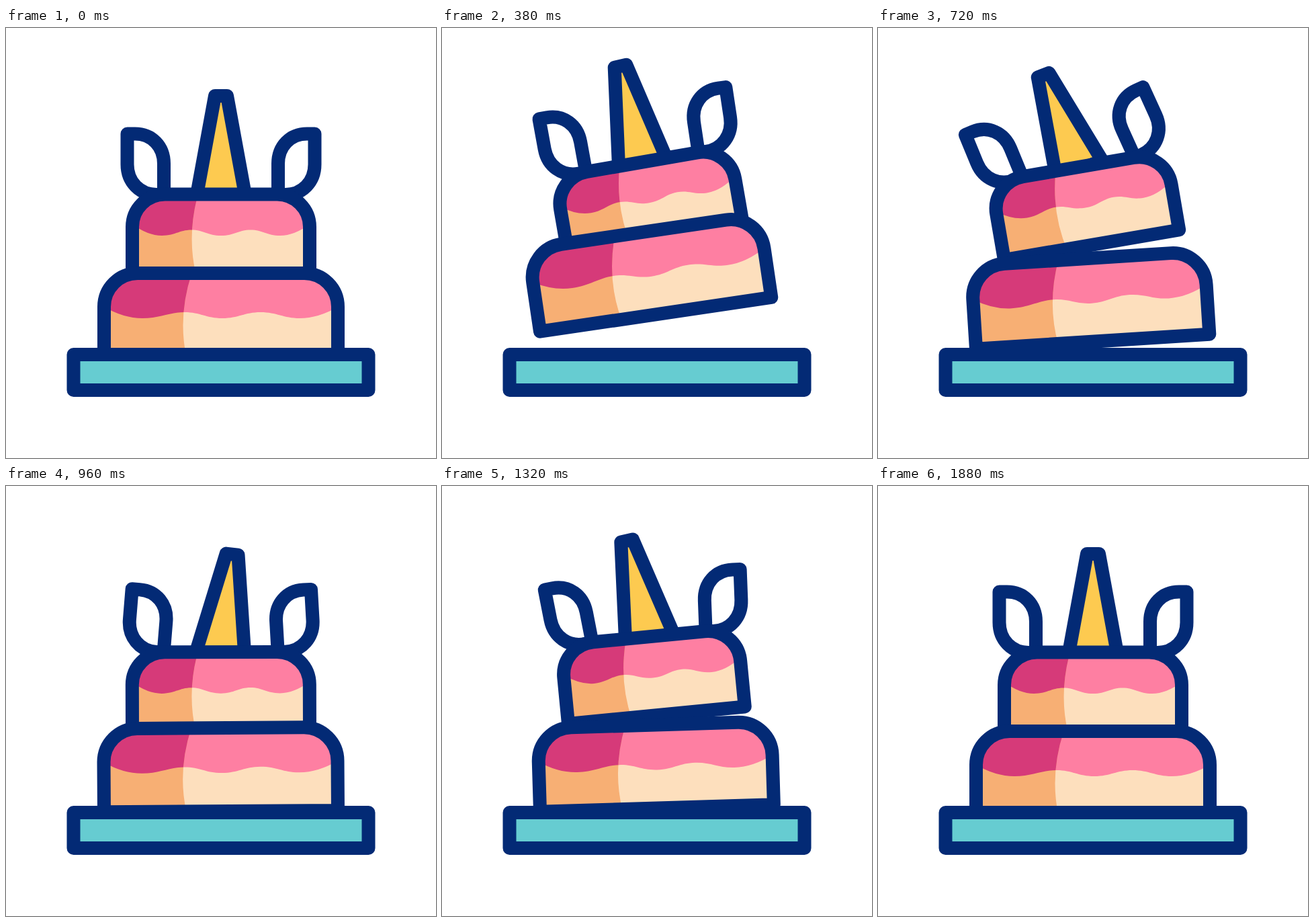
These frames come from a looping animation (640 px wide and 640 px high, 3000 ms). An HTML page:

```html
<!DOCTYPE html>
<html lang="en">
<head>
<meta charset="utf-8">
<title>Unicorn cake</title>
<style>
  html, body { margin: 0; width: 100%; height: 100%; overflow: hidden; background: #fff; }
  svg { display: block; width: 100%; height: 100%; }
  .line { fill: none; stroke: #032a75; stroke-width: 20; stroke-linejoin: round; }
  .cake { fill: #fddfbd; }
  .icing { fill: #fe7fa2; }
  .cakeShade { fill: #f7af74; }
  .icingShade { fill: #d63a79; }
  .gold { fill: #fdca50; }
  .plate { fill: #66ccd1; }
</style>
</head>
<body>
<svg viewBox="0 0 640 640">
  <defs>
    <path id="earShape" d="M180.5 157.5H192C217 157.5 235 176 235 202V248H224C199 248 180.5 229 180.5 203Z"/>
    <path id="upperBody" d="M188 365V296A48.5 48.5 0 0 1 236.5 247.5H403.5A48.5 48.5 0 0 1 452 296V365Z"/>
    <path id="lowerBody" d="M146 489V415A50 50 0 0 1 196 365H444A50 50 0 0 1 494 415V489Z"/>
    <path id="upperIcing" d="M188 240V292Q211 309 232 309C252 309 258 300.5 276 300.5S300 309 320 309S346 300.5 364 300.5S388 309 408 309Q429 309 452 292V240Z"/>
    <path id="lowerIcing" d="M146 355V415Q175 432 203 432C230 432 243 423 266 423S298 432 322 432S355 423 379 423S413 432 437 432Q465 432 494 415V355Z"/>
    <clipPath id="upperClip"><use href="#upperBody"/></clipPath>
    <clipPath id="lowerClip"><use href="#lowerBody"/></clipPath>
    <clipPath id="upperShade"><path d="M180 240H288Q268 305 283 368H180Z"/></clipPath>
    <clipPath id="lowerShade"><path d="M140 355H280Q254 425 269 492H140Z"/></clipPath>
  </defs>

  <g id="upper">
    <g id="leftEar"><use href="#earShape" class="line"/></g>
    <g id="rightEar"><use href="#earShape" class="line" transform="matrix(-1 0 0 1 640 0)"/></g>
    <g id="horn"><path class="line gold" d="M283.5 251L311 101H329L356.5 251Z"/></g>
    <g clip-path="url(#upperClip)">
      <use href="#upperBody" class="cake"/>
      <use href="#upperIcing" class="icing"/>
      <g clip-path="url(#upperShade)">
        <use href="#upperBody" class="cakeShade"/>
        <use href="#upperIcing" class="icingShade"/>
      </g>
    </g>
    <use href="#upperBody" class="line"/>
  </g>

  <g id="lower">
    <g clip-path="url(#lowerClip)">
      <use href="#lowerBody" class="cake"/>
      <use href="#lowerIcing" class="icing"/>
      <g clip-path="url(#lowerShade)">
        <use href="#lowerBody" class="cakeShade"/>
        <use href="#lowerIcing" class="icingShade"/>
      </g>
    </g>
    <use href="#lowerBody" class="line"/>
  </g>

  <rect class="line plate" x="100.5" y="486" width="439" height="53"/>
</svg>

<script>
const LOOP = 3000;
const HOP = 880;
const SECOND_HOP = { size: 0.45, duration: HOP * 0.6 };
const BEAT = 300;

// One smooth rise and fall between 0 and 1.
const bump = x => x > 0 && x < 1 ? Math.sin(Math.PI * x) ** 2 : 0;

// A full hop followed at once by a smaller, quicker one.
const hops = t => bump(t / HOP) + SECOND_HOP.size * bump((t - HOP) / SECOND_HOP.duration);

// Eased swing that reaches one extreme angle per beat and ends upright.
function sway(extremes, t) {
  const beat = Math.max(0, t / BEAT);
  const step = Math.floor(beat);
  const angleAt = i => extremes[i - 1] ?? 0;
  const ease = (1 - Math.cos(Math.PI * (beat - step))) / 2;
  return angleAt(step) + (angleAt(step + 1) - angleAt(step)) * ease;
}

function place(id, lift, angle, x, y) {
  document.getElementById(id).setAttribute('transform', `translate(0 ${-lift}) rotate(${angle} ${x} ${y})`);
}

function draw(now) {
  const t = now % LOOP;
  place('lower', 39 * hops(t), -9.3 * hops(t - 30), 146, 489);
  place('upper', 35 * hops(t - 80), -14.5 * hops(t - 110), 188, 365);
  place('horn', 0, sway([-3, -12, 7, -8, 3.5], t - 80), 320, 247);
  place('leftEar', 0, sway([-0.5, -13.5, 5, -5.7, -1.2], t - 80), 235, 247);
  place('rightEar', 0, sway([1.3, -15.3, -3, 4, -10.5], t - 80), 405, 247);
  requestAnimationFrame(draw);
}

draw(performance.now());
</script>
</body>
</html>
```
